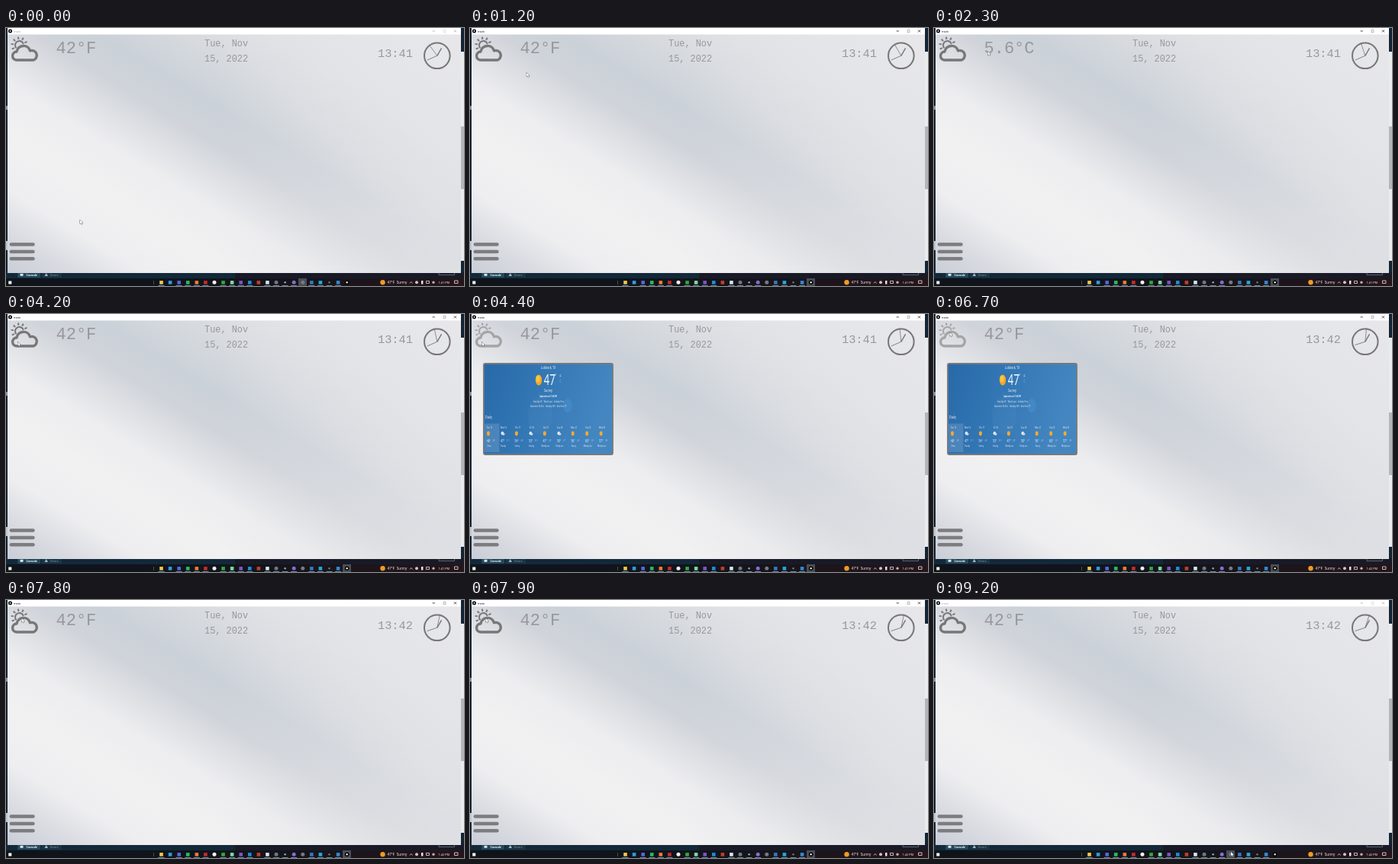
Write an HTML page with a canvas that moves like this. It is 600 by 338 pixels and loops after 9.3 s.

```html
<!DOCTYPE html>
<html lang="en">
<head>
<meta charset="utf-8">
<title>Smart mirror</title>
<style>
html, body { margin: 0; width: 100%; height: 100%; overflow: hidden; background: #101216; }
canvas { display: block; }
</style>
</head>
<body>
<canvas id="stage" width="600" height="338"></canvas>
<script>
const ctx = document.getElementById('stage').getContext('2d');
const LOOP = 9300;
const SANS = '"Open Sans", "Noto Sans", sans-serif';
const MONO = '"Liberation Mono", "Courier New", monospace';
const INK = '#777779';
const PALE = '#98989b';

function rect(x, y, w, h, color) {
  ctx.fillStyle = color;
  ctx.fillRect(x, y, w, h);
}

function dot(x, y, r, color, ry = r) {
  ctx.fillStyle = color;
  ctx.beginPath();
  ctx.ellipse(x, y, r, ry, 0, 0, 7);
  ctx.fill();
}

function line(x1, y1, x2, y2, width, color = INK) {
  ctx.strokeStyle = color;
  ctx.lineWidth = width;
  ctx.beginPath();
  ctx.moveTo(x1, y1);
  ctx.lineTo(x2, y2);
  ctx.stroke();
}

function text(str, x, y, size, color, family = SANS, align = 'left', weight = 400) {
  ctx.font = `${weight} ${size}px ${family}`;
  ctx.textAlign = align;
  ctx.fillStyle = color;
  ctx.fillText(str, x, y);
}

// Gradient along a unit normal; stops are [distance, colour]
function slope(nx, ny, stops) {
  const a = stops[0][0], b = stops[stops.length - 1][0];
  const g = ctx.createLinearGradient(nx * a, ny * a, nx * b, ny * b);
  for (const [d, c] of stops) g.addColorStop((d - a) / (b - a), c);
  return g;
}

const sky = slope(-0.52, 0.855, [
  [-300, '#e8e9ec'], [-170, '#dfe1e5'], [-105, '#d5d9de'], [-55, '#cbd1d8'], [-12, '#d0d4da'],
  [25, '#dfe1e5'], [60, '#ededef'], [120, '#f1f1f2'], [180, '#eeeef0'], [225, '#dadce2'], [274, '#c9cdd6']]);
const haze = slope(1, 0, [[280, 'rgba(230,230,233,0)'], [560, 'rgba(230,230,233,.65)']]);
const panelBlue = slope(0.95, 0.31, [[36, '#2869a8'], [110, '#3276b4'], [205, '#4486c0']]);
const barTint = slope(1, 0, [[0, '#0f141a'], [330, '#12141a'], [600, '#26151b']]);

const cloud = new Path2D('M14.2 42a5.5 5.5 0 0 1-.2-11a9 9 0 0 1 17.5-1.2a6.2 6.2 0 0 1 4.6 12.2z');

function weatherIcon(color) {
  ctx.strokeStyle = color;
  ctx.lineWidth = 3.4;
  ctx.lineJoin = 'round';
  ctx.stroke(cloud);
  ctx.lineWidth = 2;
  ctx.beginPath();
  ctx.arc(17.5, 22.5, 5.5, 2.4, 6);
  ctx.stroke();
  for (let i = 0; i < 6; i++) {
    const a = 2.65 + i * 0.64, c = Math.cos(a), s = Math.sin(a);
    line(17.5 + 7.6 * c, 22.5 + 7.6 * s, 17.5 + 11 * c, 22.5 + 11 * s, 2, color);
  }
}

function clock(sec) {
  const cx = 564.8, cy = 36.3;
  const hand = (turn, len, width) => {
    const a = turn * 2 * Math.PI;
    line(cx, cy, cx + len * Math.sin(a), cy - len * Math.cos(a), width);
  };
  ctx.strokeStyle = INK;
  ctx.lineWidth = 2;
  ctx.beginPath();
  ctx.arc(cx, cy, 16.8, 0, 7);
  ctx.stroke();
  const min = 41 + Math.floor(sec / 60);
  hand(13 / 12, 11.5, 1.4);
  hand(min / 60, 14, 0.9);
  hand(sec / 60, 18, 0.8);
  text('13:' + min, 487, 38.2, 15.3, PALE, MONO);
}

const days = ['Tue 15', 'Wed 16', 'Thu 17', 'Fri 18', 'Sat 19', 'Sun 20', 'Mon 21', 'Tue 22', 'Wed 23'];
const highs = [48, 47, 54, 53, 47, 50, 56, 60, 57];
const skies = ['Clear', 'Cloudy', 'Sunny', 'Cloudy', 'Mostly sun', 'Partly sun', 'Sunny', 'Mostly sun', 'Mostly sun'];

function panel() {
  ctx.beginPath();
  ctx.roundRect(17.8, 65, 169, 119, 2.5);
  ctx.fillStyle = panelBlue;
  ctx.fill();
  dot(92, 133, 16, 'rgba(255,255,255,.03)', 25);
  dot(128, 120, 6, 'rgba(100,180,245,.2)', 9);
  rect(19, 143.5, 19.5, 37.5, 'rgba(255,255,255,.14)');
  ctx.strokeStyle = '#77797c';
  ctx.lineWidth = 1.8;
  ctx.stroke(new Path2D('M20 65H185q2 0 2 2V182q0 2-2 2H20q-2 0-2-2V67q0-2 2-2z'));

  // The forecast is a squeezed view of a wider page
  const k = 0.66;
  ctx.save();
  ctx.scale(k, 1);
  const label = (s, x, y, size, align = 'center', weight = 400) =>
    text(s, x / k, y, size, '#fff', SANS, align, weight);
  label('Lubbock, TX', 102.5, 72, 5.3);
  dot(90 / k, 86.5, 6.4, '#f5a623', 7);
  dot(89 / k, 85, 4, '#ffc34a', 4.5);
  label('47', 96.8, 92.8, 19.5, 'left');
  label('°', 110.5, 85, 9, 'left');
  label('F', 118.5, 82.5, 5.5);
  ctx.globalAlpha = 0.6;
  label('C', 118.5, 90, 4.5);
  ctx.globalAlpha = 1;
  label('Sunny', 102.5, 102, 5.8);
  label('Updated as of 1:36 PM', 102.5, 109, 3.1, 'center', 700);
  label('Feels like 47°    Wind 3 mph    Visibility 10 mi', 103, 116, 3);
  label('Barometer 30.34 in    Humidity 29%    Dew Point 17°', 103, 121.8, 3);
  label('Daily', 20, 137, 6, 'left');
  days.forEach((day, i) => {
    const x = 25.5 + i * 18.45;
    label(day, x, 149.8, 3.5);
    if (skies[i] === 'Cloudy' || i === 5) {
      dot((x - 1.5) / k, 156.3, 2.7, '#e7eef5', 2.2);
      dot(x / k, 157.3, 2.3, '#c9d8e6', 1.8);
    } else dot((x - 1.5) / k, 156.5, 3, '#f5ab2c', 3);
    label(highs[i] + '°', x - 3.8, 167.6, 5.2, 'left');
    ctx.globalAlpha = 0.6;
    label(28 - i % 4 + '°', x + 3.8, 167.4, 4, 'left');
    ctx.globalAlpha = 1;
    label(skies[i], x - 0.5, 174, 3.2);
  });
  ctx.restore();
}

function desktop() {
  rect(0, 0, 600, 338, '#142433');
  rect(0, 102, 2, 5, '#8b9299');
  rect(0, 279, 2, 12, '#c3c7cb');
  rect(596, 31, 4, 274, '#e9ebed');
  rect(596, 129, 4, 82, '#b3b5b8');
  rect(0, 320, 300, 8, '#13293a');
  rect(300, 320, 300, 8, '#181b27');
  rect(15, 320, 30, 7, '#24485d');
  rect(47, 320, 26, 7, '#1b3546');
  rect(18.5, 321.8, 4, 3, '#dfe6ea');
  text('Console', 26.5, 324.7, 3.7, '#fff', SANS, 'left', 700);
  ctx.fillStyle = '#a9b6bf';
  ctx.fill(new Path2D('M50.5 325L52.8 321L55 325z'));
  text('Errors', 58, 324.7, 3.7, '#8f9fab');
  ctx.strokeStyle = '#8d98a1';
  ctx.lineWidth = 0.6;
  ctx.strokeRect(567, 319, 20.5, 4.5);
}

const apps = ['#f3c64e', '#2d9be8', '#5966dc', '#27bd58', '#f0793a', '#c92a2a', '#f1f1f1', '#35a83c',
  '#86d5a2', '#8153c4', '#2489d6', '#c23f2c', '#dbe3e8', '#6d7680', '#9ba9b8', '#8c68cb',
  '#77797d', '#3478bd', '#24a7dd', '#737a80', '#3487d6', '#eeeeee'];

function taskbar(active, late) {
  rect(0, 328, 600, 10, barTint);
  rect(3.3, 331.5, 4, 4, '#fff');
  rect(193, 331, 0.8, 5, '#555b62');
  rect(active ? 441 : 383, 328, 11, 10, '#4a4f55');
  apps.forEach((color, i) => {
    const x = 203.5 + i * 11.58;
    if (i === 21) dot(x, 333.3, 2.8, '#000');
    if ([6, 13, 14, 15, 16, 19, 21].includes(i))
      dot(x, 333.3, [14, 19, 21].includes(i) ? 1.2 : 2.5, color);
    else rect(x - 2.3, 331.1, 4.6, 4.6, color);
    if (i % 5 !== 1) rect(x - 4, 337.2, 8, 0.8, '#7fa9cc');
  });
  dot(493.5, 333.3, 3.2, '#f29a28');
  text('47°F  Sunny', 499.5, 335.2, 4.7, '#fff');
  ctx.strokeStyle = '#fff';
  ctx.lineWidth = 0.7;
  ctx.stroke(new Path2D('M529 334.5l1.8-2l1.8 2M550.5 331.5h4v3h-4zM587.5 331h4.5v3.5h-4.5z'));
  dot(538, 333.3, 2, '#c5c9cc');
  rect(544, 331, 2.4, 4.5, '#e8e8e8');
  dot(560, 333.3, 1.7, '#aeb3b8');
  text(late ? '1:42 PM' : '1:41 PM', 566.5, 335, 3.9, '#fff');
}

function titleBar(active) {
  const ink = active ? '#111' : '#a5a5a5';
  rect(2, 0, 594, 8.5, '#fff');
  dot(5.5, 4, 2.5, '#000');
  dot(5.5, 4, 0.9, '#fff');
  text('main', 10, 5.5, 3.9, ink);
  line(558.5, 4, 562, 4, 0.7, ink);
  ctx.lineWidth = 0.3;
  ctx.strokeRect(573, 2.6, 3, 3);
  line(587, 2.5, 590, 5.5, 0.7, ink);
  line(590, 2.5, 587, 5.5, 0.7, ink);
}

// [time, x, y]: the pointer eases from stop to stop
const trail = [[0, 97, 251.5], [500, 97, 251.5], [1400, 71, 31], [2050, 71, 31], [2100, 70.5, 30.5],
  [3100, 70.5, 30.5], [3500, 15, 37.5], [3750, 15, 37.5], [4000, 15.5, 36.5], [5150, 15.5, 36.5],
  [5600, 123.5, 119.5], [6100, 125, 121], [6500, 20, 24.5], [6650, 20, 24.5], [6700, 20.5, 24],
  [8050, 20.5, 24], [8600, 389, 330], [LOOP, 389, 330]];

function pointer(t) {
  const i = trail.findIndex(p => p[0] > t);
  const [t0, x0, y0] = trail[i - 1], [t1, x1, y1] = trail[i];
  const u = (t - t0) / (t1 - t0), e = u * u * (3 - 2 * u);
  ctx.save();
  ctx.translate(x0 + (x1 - x0) * e, y0 + (y1 - y0) * e);
  const arrow = new Path2D('M0 0V5L1.2 4L2 5.8L2.9 5.4L2.1 3.7H3.7z');
  ctx.strokeStyle = '#444';
  ctx.lineWidth = 0.8;
  ctx.stroke(arrow);
  ctx.fillStyle = '#fff';
  ctx.fill(arrow);
  ctx.restore();
}

function draw(t) {
  const active = t >= 500 && t < 9200;
  const open = t >= 4300 && t < 7800;
  const celsius = t >= 1600 && t < 2900;

  desktop();
  rect(2, 8, 594, 313, sky);
  rect(2, 8, 594, 313, haze);
  titleBar(active);

  weatherIcon(open ? '#a5a5a7' : INK);
  text(celsius ? '5.6°C' : '42°F', 65.5, 32.7, 22, PALE, MONO);
  text('Tue, Nov', 260, 24, 11.9, PALE, MONO);
  text('15, 2022', 260, 44.2, 11.9, PALE, MONO);
  clock(54 + Math.floor((t + 740) / 1010));

  ctx.lineCap = 'round';
  for (const y of [283.5, 293, 302.3]) line(6.8, y, 35.5, y, 4.4, '#7d7d80');
  ctx.lineCap = 'butt';

  if (open) panel();
  taskbar(active, t >= 6100);
  pointer(t);
}

function tick(now) {
  draw(now % LOOP);
  requestAnimationFrame(tick);
}
tick(0);
</script>
</body>
</html>
```
